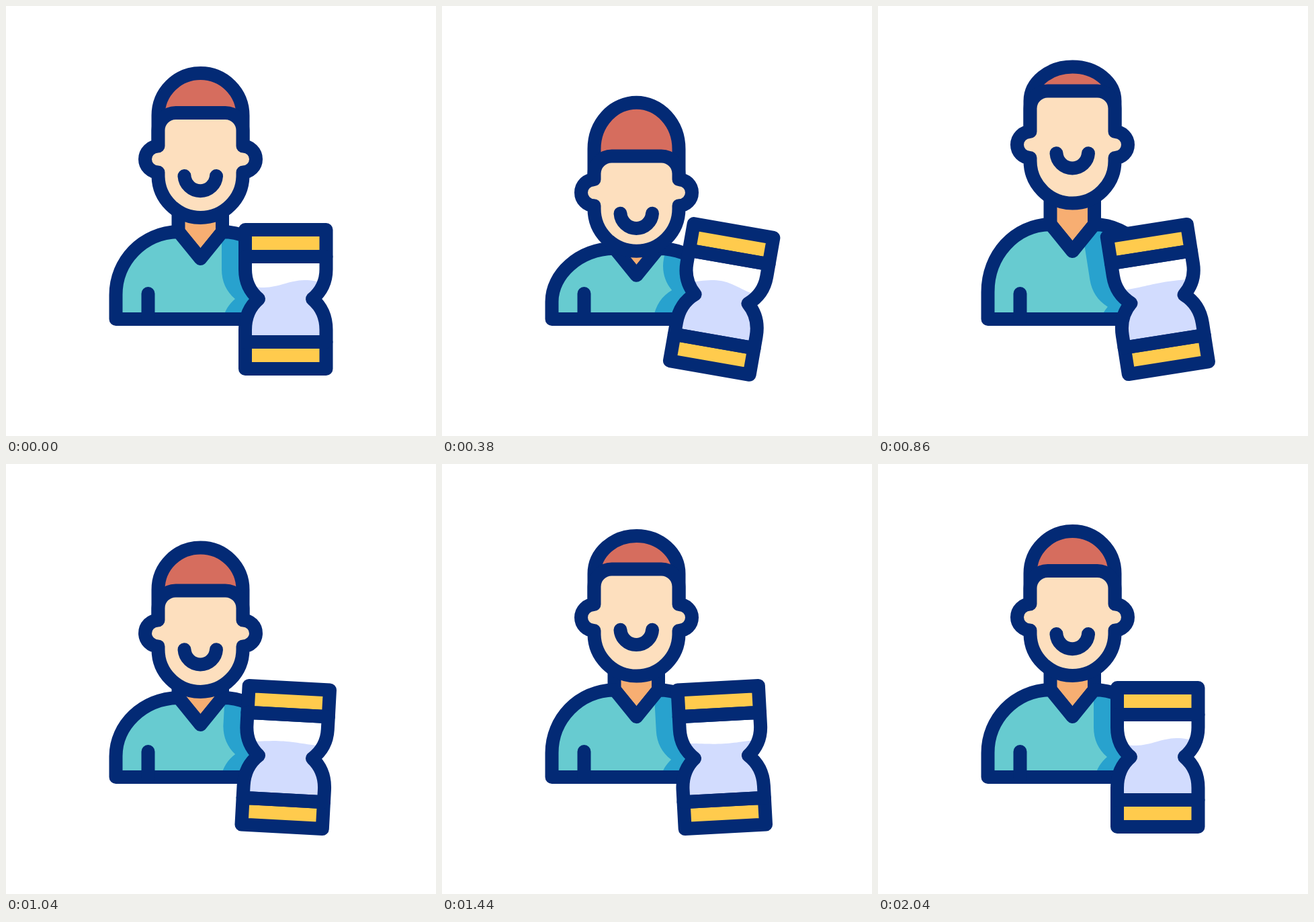
An HTML page for the animation above (2220 ms loop, 640 by 640 pixels).

```html
<!DOCTYPE html>
<html lang="en">
<head>
<meta charset="utf-8">
<title>Waiting man with hourglass</title>
<style>
  html, body { margin: 0; width: 100%; height: 100%; overflow: hidden; background: #fff; }
  svg { display: block; width: 100vw; height: 100vh; }
  .line { fill: none; stroke: #032a75; stroke-width: 20; stroke-linecap: round; stroke-linejoin: round; }
  .teal { fill: #67cbd0; }
  .blue { fill: #28a2ce; }
  .neck { fill: #f7ae72; }
  .skin { fill: #fddfbe; }
  .hair { fill: #d66d5e; }
  .gold { fill: #ffcb4d; }
  .sand { fill: #d2dcfe; }
  .white { fill: #fff; }
</style>
</head>
<body>
<svg viewBox="0 0 640 640">
  <defs>
    <clipPath id="torsoClip"><path id="torsoShape"/></clipPath>
    <clipPath id="glassClip"><use href="#bulb"/></clipPath>
    <path id="bulb" d="M356 373V392C356 410 363 425 376 436C363 447 356 462 356 482V500H476.5V482C476.5 462 469 447 456 436C469 425 476.5 410 476.5 392V373Z"/>
  </defs>

  <path id="neck" class="line neck" style="fill:#f7ae72"/>
  <path id="torsoFill" class="teal"/>
  <g clip-path="url(#torsoClip)">
    <path id="shadow" class="blue" d="M321 290V392C321 410 328 425 341 436C328 447 321 462 321 482V540H450V290Z"/>
  </g>
  <path id="torsoLine" class="line"/>
  <path class="line" d="M211.5 428V466"/>

  <path id="dome" class="line" style="fill:#d66d5e"/>
  <path id="face" class="line" style="fill:#fddfbe"/>
  <path id="smile" class="line" d="M265.5 253A23.8 23.8 0 0 0 313 253"/>

  <g id="hourglass">
    <rect class="gold" x="356" y="333" width="120.5" height="40"/>
    <rect class="gold" x="356" y="500" width="120.5" height="40"/>
    <use href="#bulb" class="white"/>
    <g clip-path="url(#glassClip)"><path id="sand" class="sand"/></g>
    <path class="line" d="M356 333H476.5V373H356ZM356 500H476.5V540H356Z"/>
    <use href="#bulb" class="line"/>
  </g>
</svg>
<script>
  const LOOP = 2220, BEAT = 400;
  const el = id => document.getElementById(id);
  const draw = (id, d) => el(id).setAttribute('d', d);
  const place = (id, value) => el(id).setAttribute('transform', value);
  const mix = (a, b, k) => a + (b - a) * k;

  // Two swings between the extremes, then rest.
  function swing(t, down, up) {
    const stops = [0, down, up, down, up, 0];
    const i = Math.floor(t / BEAT);
    if (i > 4) return 0;
    const k = (1 - Math.cos(Math.PI * (t / BEAT - i))) / 2;
    return mix(stops[i], stops[i + 1], k);
  }

  // Sand surface: time, wave height, level, travel in wavelengths.
  const sandKeys = [
    [0, 5.5, 413.5, 0],
    [180, 5.2, 415, 0.06],
    [580, 6.5, 416, 0.5],
    [860, 1.3, 414, 1.1],
    [1260, 2.6, 415.5, 1.53],
    [1640, 0.6, 414, 1.9],
    [2040, 5.5, 413.5, 2]
  ];

  function sandPath(t) {
    const time = Math.min(t, 2040);
    const n = Math.max(1, sandKeys.findIndex(key => key[0] >= time));
    const a = sandKeys[n - 1], b = sandKeys[n];
    const k = (time - a[0]) / (b[0] - a[0]);
    const [, height, level, travel] = a.map((v, i) => mix(v, b[i], k));
    let d = 'M340 510';
    for (let x = 340; x <= 492; x += 4) {
      const y = level - height * Math.cos(2 * Math.PI * ((x - 445) / 124 + travel));
      d += `L${x} ${y.toFixed(2)}`;
    }
    return d + 'V510Z';
  }

  function torsoPath(y) {
    const side = 430 + y * 0.4, top = 336 + y;
    return `M163.5 466V${side}C163.5 ${380 + y * 0.8} 203 ${top + 1} 257 ${top}` +
      `L289.5 ${top + 40}L322 ${top}C376 ${top + 1} 415 ${380 + y * 0.8} 415 ${side}V466Z`;
  }

  function facePath(head, band) {
    const line = 159 + band, ear = 208.5 + head, lobe = ear + 39;
    return `M226.5 ${ear}V${line + 26}A26 26 0 0 1 252.5 ${line}H326.5A26 26 0 0 1 352.5 ${line + 26}V${ear}` +
      `A19.5 19.5 0 0 1 352.5 ${lobe}V${252 + head}A63 63 0 0 1 226.5 ${252 + head}V${lobe}` +
      `A19.5 19.5 0 0 1 226.5 ${ear}Z`;
  }

  function domePath(head, top) {
    const base = 163 + head, ry = base - 100 - top;
    return `M226.5 ${208 + head}V${base}A63 ${ry} 0 0 1 352.5 ${base}V${208 + head}`;
  }

  function render() {
    const t = Math.floor(performance.now() % LOOP / 20) * 20;
    const head = swing(t, 50, -25.6);
    const chest = swing(t, 25, -13);
    const tilt = `rotate(${swing(t, 10, -10)} 416.3 436)`;
    const torso = torsoPath(chest);

    for (const id of ['torsoShape', 'torsoFill', 'torsoLine']) draw(id, torso);
    draw('neck', `M256.5 ${298 + head}V${336 + chest}L289.5 ${376 + chest}L322 ${336 + chest}V${298 + head}`);
    draw('dome', domePath(head, swing(t, 44, -12.5)));
    draw('face', facePath(head, swing(t, 65, -38)));
    draw('sand', sandPath(t));
    place('smile', `translate(0 ${swing(t, 56, -39)})`);
    place('hourglass', tilt);
    place('shadow', tilt);
    requestAnimationFrame(render);
  }
  render();
</script>
</body>
</html>
```
